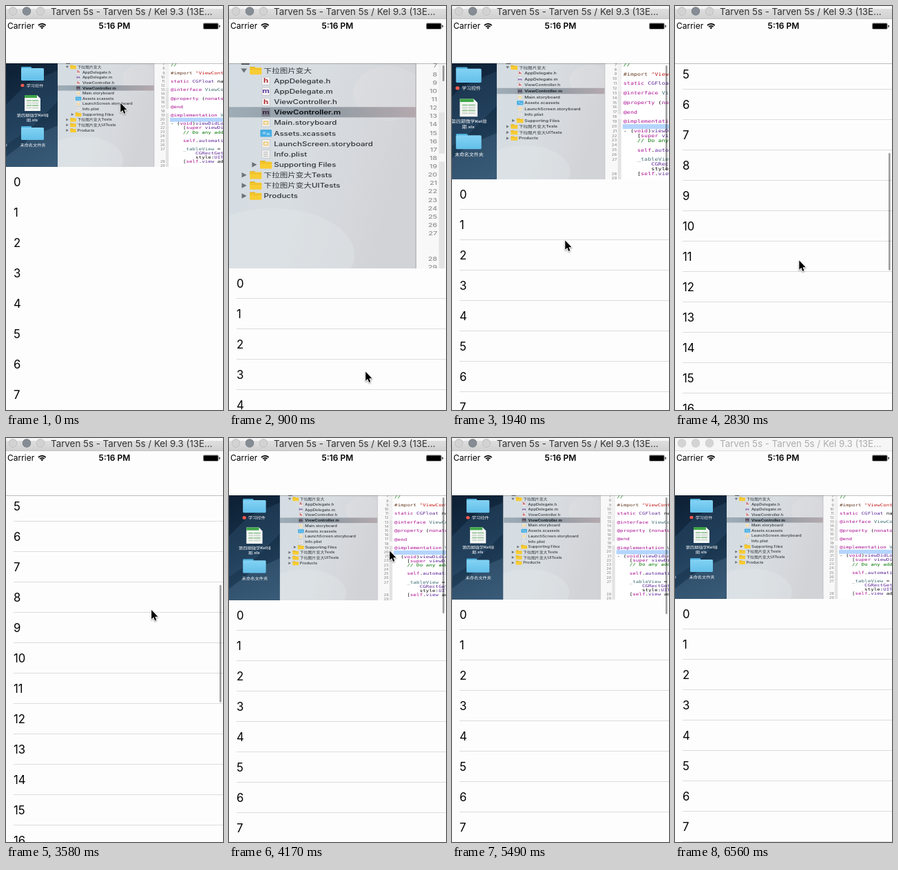
Write an HTML page with a canvas that moves like this. It is 315 by 585 pixels and loops after 6.78 s.

```html
<!DOCTYPE html>
<html lang="en">
<head>
<meta charset="utf-8">
<title>Stretchy table header</title>
<style>
  html, body { margin: 0; width: 100%; height: 100%; overflow: hidden; background: #fdfdfd; }
  canvas { display: block; width: 315px; height: 585px; }
</style>
</head>
<body>
<canvas id="stage"></canvas>
<script>
const W = 315, H = 585, BAR = 83, HEADER = 150, ROW = 44, ROWS = 30;
const VIEW = H - BAR, TAU = Math.PI * 2;
const LOOP = 6780, TICK = 148.4, BLUR_AT = 6555;
const SQUASH = 0.77; // the header picture is flattened to fit its view
const SANS = 'Inter, "Noto Sans CJK SC", "Noto Sans CJK", sans-serif';
const MONO = '"DejaVu Sans Mono", monospace';

const canvas = document.getElementById('stage');
const ctx = canvas.getContext('2d');
const dpr = window.devicePixelRatio || 1;
canvas.width = W * dpr;
canvas.height = H * dpr;

// Turning points of the pointer; times are in ticks.
const POINTER = [
  { at: 0, x: 166, y: 140 }, { at: 6, x: 198, y: 529 }, { at: 11, x: 164, y: 305 },
  { at: 15, x: 164, y: 373 }, { at: 19, x: 180, y: 368 }, { at: 28, x: 233, y: 163 },
  { at: 33, x: 233, y: 577 }, { at: 35, x: 233, y: 620 }
];
const PULLS = [
  { from: 0, release: 7, grab: 151 },
  { from: 11, release: 15, grab: 305 },
  { from: 28, release: 34, grab: 177 }
];
const FLING = { from: 15, to: 28, reach: 459, rest: 2 };

const clamp = v => Math.min(1, Math.max(0, v));
const smooth = f => f * f * (3 - 2 * f);
const spring = n => (1 + 2.6 * n) * Math.exp(-2.6 * n);

function rubber(distance) {
  const d = .55 * Math.max(0, distance);
  return d * VIEW / (d + VIEW);
}

function pointerAt(tick) {
  const i = Math.max(1, POINTER.findIndex(p => p.at >= tick));
  const last = POINTER[POINTER.length - 1];
  if (tick >= last.at) return last;
  const a = POINTER[i - 1], b = POINTER[i];
  const f = smooth(clamp((tick - a.at) / (b.at - a.at)));
  return { x: a.x + (b.x - a.x) * f, y: a.y + (b.y - a.y) * f };
}

function offsetAt(tick) {
  let offset = 0;
  for (const { from, release, grab } of PULLS) {
    if (tick < from) continue;
    const pulled = rubber(pointerAt(Math.min(tick, release)).y - grab);
    offset += pulled * spring(Math.max(0, tick - release));
  }
  const { from, to, reach, rest } = FLING;
  if (tick > from && tick <= to)
    offset += rest - reach * Math.sin(Math.PI * (tick - from) / (to - from));
  return Math.round(offset);
}

const TREE = [
  [0, 'open', '下拉图片变大'], [1, 'h', 'AppDelegate.h'], [1, 'm', 'AppDelegate.m'],
  [1, 'h', 'ViewController.h'], [1, 'm', 'ViewController.m'], [1, 'board', 'Main.storyboard'],
  [1, 'assets', 'Assets.xcassets'], [1, 'board', 'LaunchScreen.storyboard'],
  [1, 'plist', 'Info.plist'], [1, 'shut', 'Supporting Files'],
  [0, 'shut', '下拉图片变大Tests'], [0, 'shut', '下拉图片变大UITests'], [0, 'shut', 'Products']
];
const SELECTED = 4;

const FIRST_LINE = 7;
const CODE = `//

#import "ViewController.h"

static CGFloat naviHeight

@interface ViewController ()

@property (nonatomic, strong)

@end

@implementation ViewController

- (void)viewDidLoad {
    [super viewDidLoad];
    // Do any additional

    self.automatically

    _tableView = [[
        CGRectGetWidth
        style:UITableView
    [self.view addSubview
`.split('\n');
const CURRENT = 13;

const INKS = [
  [/^\/\//, '#007400'], [/^"/, '#c41a16'], [/^#/, '#643820'],
  [/^(@\w+|static|void|super|self|nonatomic|strong)$/, '#aa0d91'],
  [/^(CG|UI|view$|viewDid|automatically)/, '#5c2699'],
  [/^(_|ViewController)/, '#3f6e74'], [/./, '#111']
];
const inkOf = token => INKS.find(([rule]) => rule.test(token))[1];

function rect(x, y, w, h, fill) {
  ctx.fillStyle = fill;
  ctx.fillRect(x, y, w, h);
}

function round(x, y, w, h, r, fill) {
  ctx.fillStyle = fill;
  ctx.beginPath();
  ctx.roundRect(x, y, w, h, r);
  ctx.fill();
}

function oval(x, y, rx, ry, fill) {
  ctx.fillStyle = fill;
  ctx.beginPath();
  ctx.ellipse(x, y, rx, ry, 0, 0, TAU);
  ctx.fill();
}

function shape(path, x, y, fill) {
  ctx.save();
  ctx.translate(x, y);
  ctx.fillStyle = fill;
  ctx.fill(new Path2D(path));
  ctx.restore();
}

function shade(x0, y0, x1, y1, ...colors) {
  const g = ctx.createLinearGradient(x0, y0, x1, y1);
  colors.forEach((c, i) => g.addColorStop(i / (colors.length - 1), c));
  return g;
}

function text(str, x, y, size, fill, weight = 400, align = 'left', family = SANS) {
  ctx.font = `${weight} ${size}px ${family}`;
  ctx.textAlign = align;
  ctx.textBaseline = 'middle';
  ctx.fillStyle = fill;
  ctx.fillText(str, x, y);
}

function flatText(str, x, y, ...style) {
  ctx.save();
  ctx.translate(x, y);
  ctx.scale(1, SQUASH);
  text(str, 0, 0, ...style);
  ctx.restore();
}

const caption = (str, x, y) => flatText(str, x, y, 6.2, '#fff', 500, 'center');

function desktopFolder(y) {
  round(22, y, 15, 5, 1, '#4fb0dc');
  round(22, y + 2, 33, 18, 1.5, shade(0, y, 0, y + 20, '#86d5f6', '#63bfe9'));
}

function drawDesktop() {
  rect(-2, 0, 77, HEADER, shade(0, 0, 60, HEADER, '#0d1f33', '#17324b', '#2a4a66'));
  shape('M0 60L30 30L75 10V55L35 95L0 118Z', 0, 0, 'rgba(70,110,145,.22)');
  shape('M0 135L40 105L75 90V150H0Z', 0, 0, 'rgba(110,150,180,.22)');
  desktopFolder(5);
  oval(24, 32, 2.6, 2.3, '#fc5b4f');
  caption('学习控件', 42, 32.3);
  shape('M0 0H18L23 5V23H0Z', 27, 46, '#f5f7f5');
  rect(27, 46, 18, 4, '#3fa648');
  for (let i = 0; i < 4; i++) rect(30, 53 + i * 3.5, 17, 2, i % 2 ? '#cfd8cf' : '#9fcaa2');
  rect(37, 52, .8, 15, '#f5f7f5');
  caption('第四期微学Kel排', 39, 75.5);
  caption('期.xls', 38, 82.5);
  desktopFolder(91);
  caption('未命名文件夹', 39, 118.5);
  caption('e', 0, 119);
}

const isFolder = kind => kind === 'open' || kind === 'shut';

function drawFolder(x, y, open) {
  shape(open ? 'M-2.2 -1.5H2.2L0 1.6Z' : 'M-1.6 -1.9L2 0L-1.6 1.9Z', x - 4.3, y, '#6d7278');
  round(x, y - 2.8, 4, 2, .5, '#e2ae1b');
  round(x, y - 2.1, 8.7, 5, .5, '#f8cc33');
  rect(x, y - 1.2, 8.7, .4, '#e3b221');
}

function drawFile(kind, x, y, selected) {
  if (kind === 'assets') {
    round(x - .3, y - 2.6, 8.4, 5.2, .6, '#45aee4');
    rect(x + 1.5, y - 1, 2.2, 1.6, '#8fd0f2');
    rect(x + 4.4, y - .2, 2.2, 1.6, '#8fd0f2');
    return;
  }
  rect(x + .8, y - 3, 6, 6, selected ? '#6b6d78' : '#b4b8bc');
  rect(x + 1.1, y - 2.7, 5.4, 5.4, selected ? '#858792' : '#f4f4f4');
  if (kind === 'board') {
    round(x + 1.8, y - 1.6, 4, 3.2, .5, '#eccd83');
    rect(x + 2.8, y - .7, 2, 1.4, '#fbf0d4');
  } else if (kind === 'plist') {
    for (let i = 0; i < 3; i++) rect(x + 2, y - 1.6 + i * 1.4, 3.4, .5, '#aaa');
  } else {
    flatText(kind, x + 3.8, y, 5.8, selected ? '#35243f' : kind === 'h' ? '#b5262e' : '#5b3a9a', 700, 'center');
  }
}

function drawTree() {
  ctx.save();
  ctx.beginPath();
  ctx.rect(75, 0, 140, HEADER);
  ctx.clip();
  rect(75, 0, 140, HEADER, shade(75, 0, 215, 40, '#d4dde3', '#d8dde1', '#d2d3d7'));
  oval(195, 22, 26, 20, 'rgba(230,226,228,.25)');
  oval(110, 140, 60, 34, 'rgba(226,232,236,.35)');
  rect(87, 0, 6, 1, '#5b5f64');
  TREE.forEach(([indent, kind, name], i) => {
    const y = 5.3 + i * 7.64, selected = i === SELECTED;
    if (selected) rect(75, y - 3.9, 140, 7.6, shade(75, 0, 215, 0, '#9fadb7', '#8f9aa3', '#b4a9ad'));
    if (isFolder(kind)) drawFolder(indent ? 100.7 : 93.2, y, kind === 'open');
    else drawFile(kind, 101.2, y, selected);
    flatText(name, indent ? 110.9 : 103.5, y + .3, 5.85, selected ? '#0b0d10' : '#303438', selected ? 600 : 500);
  });
  ctx.restore();
}

function drawCode() {
  const advance = 4.515, lineY = row => 2 + row * 6.13;
  rect(215, 0, 102, HEADER, '#fff');
  rect(215, 0, 16.8, HEADER, '#f8f8f8');
  rect(214.7, 0, .6, HEADER, '#aeb1b5');
  rect(231.8, 0, 4.4, HEADER, '#e3e3e3');
  rect(231.8, 0, 4.4, 36, '#f1f1f1');
  rect(231.8, 66, 4.4, 6, '#f8f8f8');
  rect(238, lineY(CURRENT) - 3, 80, 6.1, '#b4d5fe');
  let number = FIRST_LINE;
  CODE.forEach((line, row) => {
    const y = lineY(row), wrapped = line.startsWith(' '.repeat(8));
    if (!wrapped) flatText(number++, 230.6, y, 5.4, '#8e8e8e', 500, 'right');
    for (const { 0: token, index } of line.matchAll(/\/\/.*|"[^"]*"|[#@]?\w+|[^\w\s]/g))
      flatText(token, 239 + index * advance, y, 7.5, inkOf(token), 400, 'left', MONO);
  });
}

function drawHeader(offset) {
  const scale = 1 + Math.max(offset, 0) / HEADER;
  const top = BAR + Math.min(offset, 0);
  ctx.save();
  ctx.beginPath();
  ctx.rect(0, top, W, HEADER * scale);
  ctx.clip();
  ctx.translate(W / 2, top);
  ctx.scale(scale, scale);
  ctx.translate(-W / 2, 0);
  drawDesktop();
  drawTree();
  drawCode();
  ctx.restore();
}

function drawList(offset, separators) {
  for (let i = 0; i < ROWS; i++) {
    const y = BAR + HEADER + offset + i * ROW;
    if (y > H || y < BAR - ROW) continue;
    text(i, 11, y + 22.5, 16.7, '#000');
    if (separators) rect(11, y + 43, W - 11, 1, '#dcdcde');
  }
}

function drawIndicator(offset) {
  const length = Math.max(170 - Math.max(offset, 0), 7);
  round(310, 86 - Math.min(offset, 0) * .337, 2.6, length, 1.3, 'rgba(0,0,0,.38)');
}

function drawStatusBar() {
  rect(0, 19, W, BAR - 19, '#fdfdfd');
  rect(0, BAR, W, 1, 'rgba(0,0,0,.25)');
  text('Carrier', 2, 29.8, 12, '#000');
  text('5:16 PM', 157.5, 29.8, 12, '#000', 600, 'center');
  ctx.strokeStyle = '#000';
  ctx.lineWidth = 1.7;
  for (const r of [4.4, 7.4]) {
    ctx.beginPath();
    ctx.arc(52.3, 33.2, r, -Math.PI * .76, -Math.PI * .24);
    ctx.stroke();
  }
  shape('M-1.9 -2.3L0 -3.1L1.9 -2.3L0 0Z', 52.3, 33.6, '#000');
  round(286, 24.6, 22.6, 9.2, 1.8, '#8a8a8a');
  round(287, 25.5, 20.6, 7.4, 1, '#000');
  round(309.3, 27.6, 1.5, 3.4, .7, '#333');
}

function drawTitleBar(active) {
  rect(0, 0, W, 19, '#f6f6f6');
  if (active) rect(0, 4, W, 15, shade(0, 4, 0, 19, '#dedede', '#d0d0d0'));
  rect(0, 18, W, 1, active ? '#c2c2c2' : '#dedede');
  for (const x of [10, 30, 50]) {
    const dark = active && x === 30;
    oval(x, 7.5, 6.2, 6.2, dark ? '#747b83' : active ? '#b9b9b9' : '#cacaca');
    oval(x, 7.5, 5.5, 5.5, dark ? '#858c94' : active ? '#d2d2d2' : '#d4d4d4');
  }
  text('Tarven 5s - Tarven 5s / Kel 9.3 (13E...', 65, 8.6, 13.35, active ? '#333' : '#adadad');
}

function drawPointer({ x, y }) {
  const arrow = new Path2D('M0 0V13.2L3 10.4L5 15.4L7.1 14.5L5.1 9.7H9.3Z');
  ctx.save();
  ctx.translate(x + .3, y + .6);
  ctx.lineJoin = 'round';
  ctx.lineWidth = 1.8;
  ctx.strokeStyle = '#fff';
  ctx.shadowColor = 'rgba(0,0,0,.4)';
  ctx.shadowBlur = 2 * dpr;
  ctx.shadowOffsetY = dpr;
  ctx.stroke(arrow);
  ctx.shadowColor = 'transparent';
  ctx.fillStyle = '#000';
  ctx.fill(arrow);
  ctx.restore();
}

function draw(time) {
  const tick = Math.floor((time + 1) / TICK);
  const offset = offsetAt(tick);
  ctx.setTransform(dpr, 0, 0, dpr, 0, 0);
  rect(0, 0, W, H, '#fdfdfd');
  drawHeader(offset);
  drawList(offset, tick > 0);
  if (offset) drawIndicator(offset);
  drawStatusBar();
  drawTitleBar(time < BLUR_AT);
  drawPointer(pointerAt(tick));
}

const start = performance.now();
function loop() {
  draw((performance.now() - start) % LOOP);
  requestAnimationFrame(loop);
}
loop();
</script>
</body>
</html>
```
